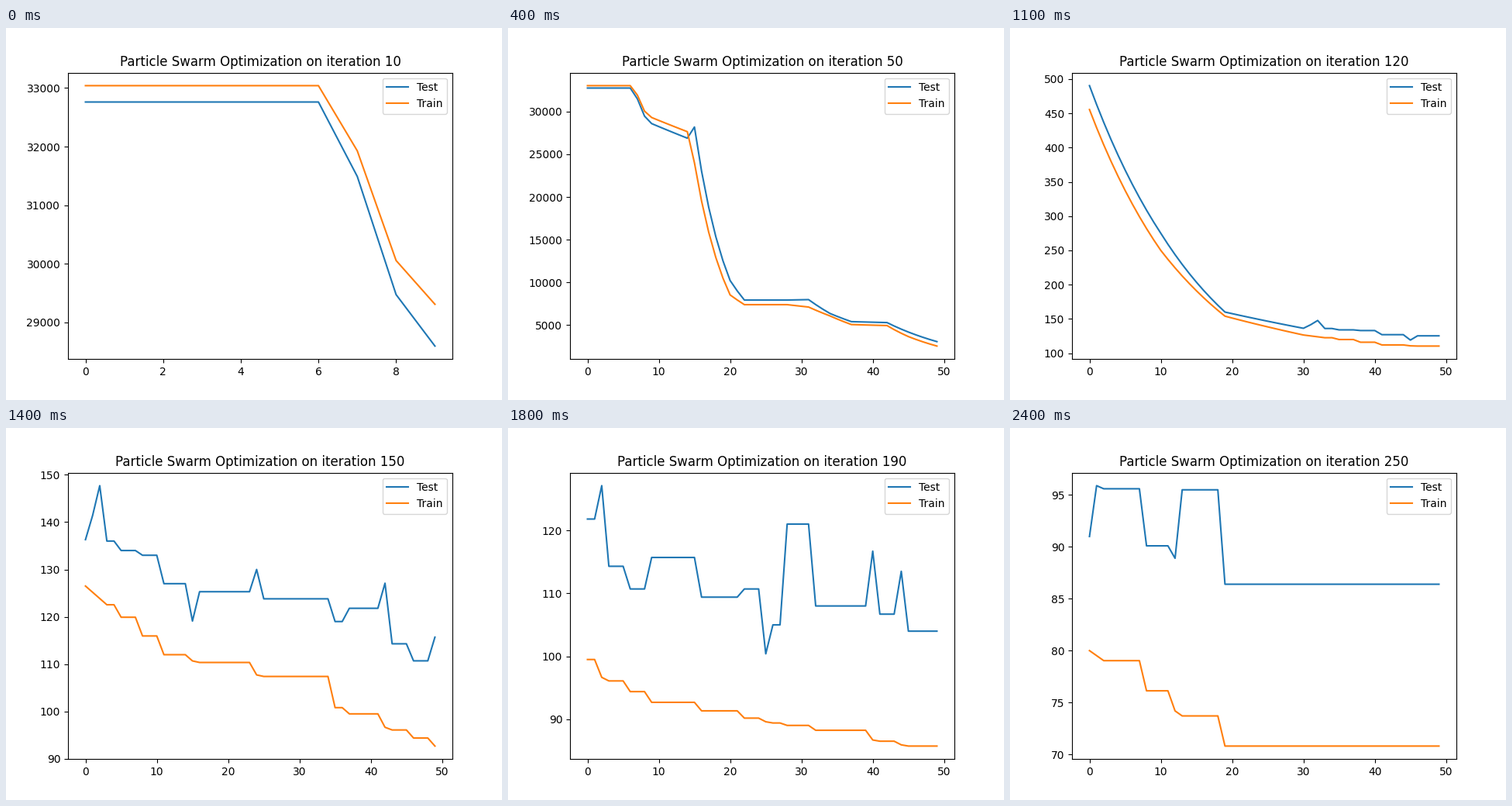
A matplotlib script that plays this animation: 640 by 480 pixels, repeating every 3.41 s.

```python
import numpy as np
import matplotlib.pyplot as plt
from matplotlib.animation import FuncAnimation

TICK = 10          # ms per animation frame
LOOP = 3410        # ms per loop
STAGE = 100        # ms between plot updates
BATCH = 10         # iterations added per update
WINDOW = 50        # iterations visible at once
TOTAL = 250
SETTLE = 100       # iteration where smooth decay turns into steps

# Key points of the decay: iteration, test, train.
DECAY = [
    (6, 32762, 33041), (7, 31492, 31929), (8, 29475, 30057),
    (9, 28597, 29310), (14, 26890, 27650), (15, 28200, 24000),
    (20, 10220, 8530), (22, 7930, 7390), (28, 7930, 7390),
    (31, 7980, 7110), (34, 6360, 6070), (37, 5400, 5060),
    (42, 5291, 4940), (45, 4180, 3650), (50, 2830, 2320),
    (55, 1430, 1435), (65, 655, 615), (80, 275, 250),
    (89, 160, 154), (100, 136.3, 126.5),
]
# Later the train error follows a line, sampled whenever a better swarm is found.
TREND = [(100, 126.5), (111, 112), (125, 107.4), (137, 99.5),
         (149, 92.7), (191, 84.6), (200, 80), (219, 70.8)]
# Iterations with a better swarm, and the test error it gives.
FINDS = [
    (100, 136.3), (101, 141.4), (102, 147.7), (103, 136), (105, 134),
    (108, 133), (111, 127), (115, 119.1), (116, 125.3), (124, 130),
    (125, 123.8), (135, 119), (137, 121.8), (142, 127.1), (143, 114.3),
    (146, 110.7), (149, 115.7), (156, 109.4), (162, 110.7), (165, 100.4),
    (166, 105), (168, 121), (172, 108), (180, 116.7), (181, 106.7),
    (184, 113.5), (185, 104), (191, 110), (197, 99.1), (200, 91),
    (201, 95.9), (202, 95.6), (208, 90.1), (212, 88.9), (213, 95.5),
    (219, 86.4),
]


def decay(x, keys, values):
    """Constant-rate exponential decay between key points."""
    return np.exp(np.interp(x, keys, np.log(values)))


def hold(x, starts, levels):
    """Each level stays until the next start."""
    return levels[np.searchsorted(starts, x, side="right") - 1]


def build_curves():
    early = np.arange(SETTLE)
    late = np.arange(SETTLE, TOTAL)
    keys, *decays = np.array(DECAY).T
    starts, test_levels = np.array(FINDS).T
    train_levels = np.interp(starts, *np.array(TREND).T)
    return [
        np.concatenate([decay(early, keys, d), hold(late, starts, levels)])
        for d, levels in zip(decays, (test_levels, train_levels))
    ]


curves = build_curves()

fig, ax = plt.subplots(figsize=(6.4, 4.8), dpi=100)
lines = [ax.plot([], [], label=name)[0] for name in ("Test", "Train")]
ax.legend(loc="upper right")
title = ax.set_title("")


def update(frame):
    done = min(BATCH * (frame * TICK // STAGE + 1), TOTAL)
    start = max(0, done - WINDOW)
    for line, curve in zip(lines, curves):
        line.set_data(np.arange(done - start), curve[start:done])
    ax.relim()
    ax.autoscale_view()
    title.set_text(f"Particle Swarm Optimization on iteration {done}")
    return *lines, title


def init():
    return update(0)


anim = FuncAnimation(fig, update, frames=LOOP // TICK, init_func=init,
                     interval=TICK, repeat=True, repeat_delay=0, blit=False)
plt.show()
```
